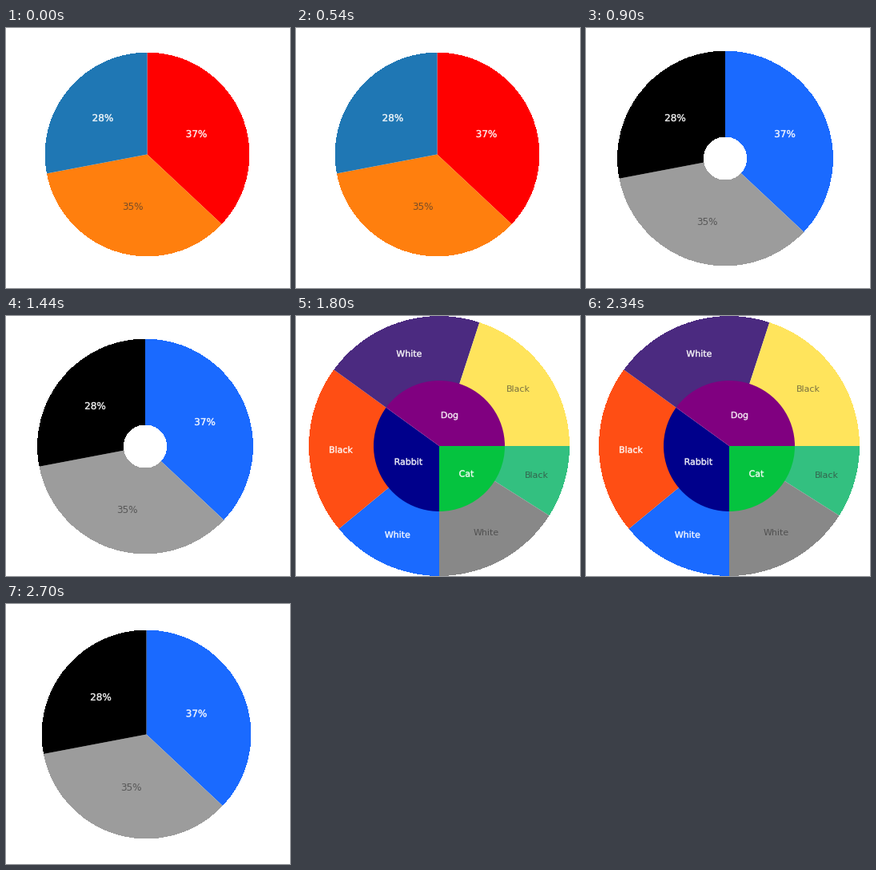
Write a matplotlib script that moves like this. It is 355 px wide and 326 px high and loops after 3600 ms.

```python
import matplotlib.pyplot as plt
from matplotlib.animation import FuncAnimation
from matplotlib.patches import Circle, Wedge
from matplotlib.patheffects import withStroke

W, H, DPI = 355, 326, 64
PX = 72 / DPI  # points per pixel
GROW = 0.5     # hard-edged fills spread by half a pixel
BLUE, GREY, DARK = "#1a6aff", "#9c9c9c", "#333333"

fig = plt.figure(figsize=(W / DPI, H / DPI), dpi=DPI, facecolor="white")
ax = fig.add_axes([0, 0, 1, 1])


def reset():
    ax.clear()
    ax.set_xlim(0, W)
    ax.set_ylim(H, 0)
    ax.axis("off")


def slices(center, r, start, parts, width=None):
    """Clockwise wedges; parts are (percent, colour)."""
    for percent, color in parts:
        end = start + percent * 3.6
        ax.add_patch(Wedge(center, r, start, end, width=width, fc=color, lw=0))
        start = end


def crisp_rim(center, r):
    """White ring that cuts the disc off with a hard edge."""
    ax.add_patch(Wedge(center, r + GROW + 40, 0, 360, width=40, fc="white",
                       lw=0, antialiased=False))


def label(x, y, text, color="white", size=12):
    t = ax.text(x, y + size * 0.365, text, color=color, alpha=0.65,
                ha="center", va="baseline", family="DejaVu Sans",
                size=size * PX)
    if color == "white":
        t.set_path_effects([withStroke(linewidth=0.45 * PX, foreground=color,
                                       alpha=0.65)])


def pie(center, r, colors, spots, hole=0):
    slices(center, r + 2, -90, zip((37, 35, 28), colors))
    crisp_rim(center, r)
    if hole:
        ax.add_patch(Circle(center, hole - GROW, fc="white", lw=0,
                            antialiased=False))
    for spot, text, color in zip(spots, ("37%", "35%", "28%"),
                                 ("white", DARK, "white")):
        label(*spot, text, color)


def warm_pie():
    pie((176.5, 158.5), 128, ("#ff0000", "#ff7f0e", "#1f77b4"),
        ((238, 132.5), (158, 223.5), (121, 112.5)))


def donut():
    pie((174, 163.5), 135, (BLUE, GREY, "black"),
        ((248.5, 132.5), (151.5, 242.5), (111.5, 112.5)), hole=27)


def cool_pie():
    pie((175.5, 163.5), 131, (BLUE, GREY, "black"),
        ((238, 137), (156, 230), (118.5, 116.5)))


def sunburst():
    center = (179, 163)
    slices(center, 165, 0, ((9, "#33c080"), (16, "#888888"), (14, BLUE),
                            (21, "#ff4e14"), (20, "#4b2a80"), (20, "#ffe45c")),
           width=84)
    slices(center, 82, 0, ((25, "#05c33f"), (35, "#00008b"), (40, "#800080")))
    crisp_rim(center, 163)
    for x, y, text in ((192, 124, "Dog"), (140.5, 182.5, "Rabbit"),
                       (213, 197.5, "Cat"), (141.5, 47, "White"),
                       (56, 167.5, "Black"), (127, 274, "White")):
        label(x, y, text, size=11)
    for x, y, text in ((278, 91, "Black"), (301, 199, "Black"),
                       (238, 270.5, "White")):
        label(x, y, text, DARK, size=11)


SCENES = (warm_pie, donut, sunburst, cool_pie)


def draw(i):
    reset()
    SCENES[i]()
    return []


anim = FuncAnimation(fig, draw, frames=len(SCENES), interval=900,
                     init_func=lambda: draw(0), repeat=True, repeat_delay=0)
plt.show()
```
